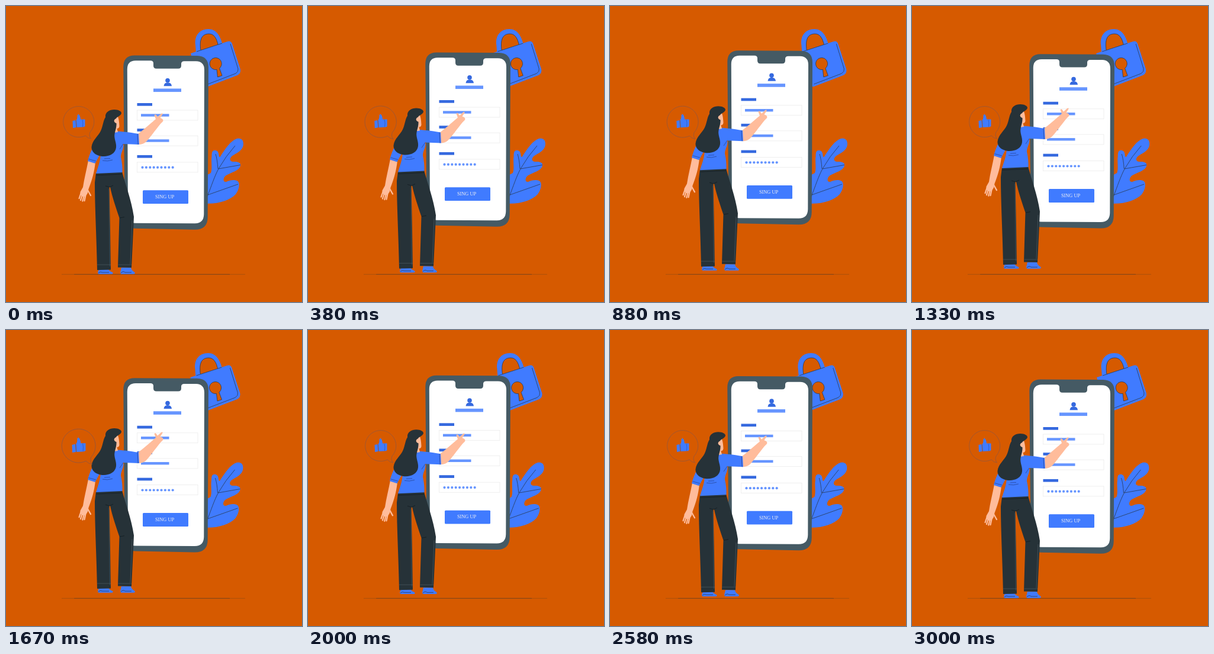
An HTML page with a canvas for the animation above (3.04 s loop, 500 by 500 pixels).

```html
<!DOCTYPE html>
<html lang="en">
<head>
<meta charset="utf-8">
<title>Sign up</title>
<style>
  html, body { margin: 0; width: 100%; height: 100%; overflow: hidden; background: #d65a00; }
  canvas { display: block; width: 500px; height: 500px; }
</style>
</head>
<body>
<canvas id="stage"></canvas>
<script>
const canvas = document.getElementById('stage');
const ctx = canvas.getContext('2d');
const ratio = window.devicePixelRatio || 1;
canvas.width = canvas.height = 500 * ratio;

const BG = '#d65a00', BLUE = '#407bff', DEEP = '#3569df', SOFT = '#6695ff';
const DARK = '#263238', SLATE = '#455a64', SKIN = '#ffbc9b';
const LOOP = 3040, FPS = 24, LAST = 72, CYCLE = 1500, PHONE_Y = 0.7;

function fill(d, color, rule = 'nonzero') {
  ctx.fillStyle = color;
  ctx.fill(new Path2D(d), rule);
}

function line(d, color = DARK, width = 0.7) {
  ctx.strokeStyle = color;
  ctx.lineWidth = width;
  ctx.stroke(new Path2D(d));
}

function bar(x, y, w, h, color) {
  ctx.fillStyle = color;
  ctx.fillRect(x, y, w, h);
}

function dot(x, y, r, color) {
  ctx.fillStyle = color;
  ctx.beginPath();
  ctx.arc(x, y, r, 0, Math.PI * 2);
  ctx.fill();
}

function moved(dx, dy, draw) {
  ctx.save();
  ctx.translate(dx, dy);
  draw();
  ctx.restore();
}

const linear = u => u;
const easeOut = u => 1 - Math.pow(1 - u, 1.4);

// Eased interpolation through [position, value] stops.
function track(stops, p, ease) {
  for (let i = 1; i < stops.length; i++) {
    const [a, va] = stops[i - 1], [b, vb] = stops[i];
    if (p <= b) return va + (vb - va) * ease((p - a) / (b - a));
  }
  return stops[stops.length - 1][1];
}

const SHAKE = [0, -1, 2, -4, 4, -4, 4, -4, 2, -1, 0].map((v, i) => [i / 10, v]);
const BEAT = [[0, 1], [0.1, 1.1], [0.3, 1], [0.4, 1], [0.5, 1.1], [0.6, 1], [1, 1]];

const phase = (t, period) => (t % period) / period;
const float = (t, period) => -10 * (1 - Math.abs(1 - 2 * phase(t, period)));
const shake = t => t < 0 ? 0 : track(SHAKE, phase(t, CYCLE), easeOut);

function ground() {
  line('M94 453.3H404', 'rgba(38,50,56,.35)', 0.7);
  line('M115 453.3H378', 'rgba(38,50,56,.45)', 0.8);
}

function lock() {
  fill('M321 80 L320 66 C318 51 326 39 342 39 C355 39 362 50 366 66 Z ' +
       'M329 75 C327 61 328 47 343 47 C352 47 356 56 358 65 Z', BLUE, 'evenodd');
  line('M329 75 C327 61 328 47 343 47 C352 47 356 56 358 65');
  fill('M312 80 L374 60 Q380 58 382 64 L396 107 Q397 114 391 117 L340 136.500 L326 130 Z', BLUE);
  line('M322 77 L365 63 M379 64 L392 106 Q393 111 388 114 L341 132');
  const hole = 'M356 107.300 A10 10 0 1 1 360.500 105.200 L365 117.500 L357.500 120 Z';
  fill(hole, BG);
  line(hole);
}

function leaf() {
  fill('M335 333.500 C357 335 378 329 388 318 C393 311 395 303 393 298 C390 292 379 294 372 297 ' +
       'C366 298 366 290 372 286 C381 281 394 278 396 270 C397.500 263 389 263 383 263 ' +
       'C377 262 377 256 384 252 C393 247 401 242 401 233 C401 225 396 223 390 224 ' +
       'C379 228 371 240 361.500 255 C358 255 361.500 246 354.500 244 C348.500 243 347.500 247 347.500 254 ' +
       'C346 262 349 275 346 282 L335 288 Z', BLUE);
  line('M340 322 C347 304 352 288 359 275 Q371 254 387 236 M358 275 Q357 259 354 250 ' +
       'M359 275 L396 268.500 M341 319 L392 301');
}

function phone() {
  fill('M217 82.800 L323 83.300 Q342 84 342 103 L340.700 356 Q340.500 377 319 377 L218 375 ' +
       'Q201 375 200.500 357 L198.300 102 Q198.300 82.800 217 82.800 Z', SLATE);
  fill('M219 91.500 L244 91.500 Q249 91.500 249 96 V100 Q249 105 254 105 H291 Q296 105 296 100 V97 ' +
       'Q296 92.500 301 92.500 L321 92.500 Q335 93 335 107 L334.300 351 Q334 366.500 319 366.500 ' +
       'L218 366 Q206 366 206 352 L204.800 106 Q204.800 91.500 219 91.500 Z', '#fff');

  dot(273, 125, 3.8, DEEP);
  fill('M266.500 134.500 Q267 128.500 273 128.500 Q279.500 128.500 280 134.500 Z', DEEP);
  bar(249, 138.8, 47, 5.6, SOFT);

  for (const y of [163.3, 206.5, 251.2]) {
    bar(221.5, y, 25.5, 4.7, DEEP);
    ctx.strokeStyle = '#ebebeb';
    ctx.lineWidth = 0.8;
    ctx.strokeRect(221.5, y + 12, 102.5, 17);
  }
  bar(228, 181.6, 47.5, 4.4, SOFT);
  bar(228, 224.6, 47.5, 4.4, SOFT);
  for (let i = 0; i < 9; i++) dot(230.5 + i * 6.4, 272, 2.1, SOFT);

  ctx.fillStyle = BLUE;
  ctx.beginPath();
  ctx.roundRect(231, 310.6, 77, 22.8, 1.5);
  ctx.fill();
  ctx.fillStyle = '#f2f2f2';
  ctx.font = '8.3px "Liberation Serif", "Times New Roman", serif';
  ctx.textAlign = 'center';
  ctx.fillText('SING UP', 268, 324.4);
}

function arms() {
  fill('M223 216 C234 208 243 199 253 191 L250.500 184.500 Q252 182 254 184.500 L256 187.500 ' +
       'L262 182 Q265 180 264.500 183 L260.500 189 Q267 191 265 195 L261 199 ' +
       'C252 210 242 224 236 230 Q231 234 224 234 Z', SKIN);
  fill('M139 261 L151 264 C149 281 146 292 139.500 309 L138 316 Q135 322 130 322 ' +
       'Q125 321 125.500 314 L130 306 C132 292 136 277 139 261 Z', SKIN);
  ctx.lineCap = 'round';
  line('M127 315 L123.600 325 M129 318 L126 328 M132 319 L129.300 329.500 M135 317 L132.500 329 ' +
       'M138 311 L143 320', SKIN, 2.3);
  ctx.lineCap = 'butt';
}

function shoes() {
  fill('M157 445 H173 Q175 448 180 450 Q182 452.500 178 452.700 H156 L155 450 Z', BLUE);
  fill('M195 442 H211 Q212 447 217 449.500 Q219.500 452.500 215 452.700 H194 L193 450 Z', BLUE);
  line('M156 451 Q159 448 163 450 H174 M194 451 Q198 447 201 450 H212');
}

function trousers() {
  fill('M152 282 L196 280 C201 299 212 328 216 356 L214 400 L212 442 L189 441.500 L191.500 358 ' +
       'C186 341 180 325 176 306 L174.500 306 L176 380 L177 445.500 L154 446 C153 391 150 340 150 298 Z', DARK);
  const seam = '#5a6a72';
  line('M152 286 L196 284 M168 304 L175 306 L181 303 M192 358 L200 356.500', '#11191d', 0.7);
  line('M174 309 L175.500 440 M154 437 H177 M189.500 437 H212 M213 362 L210 436', seam, 0.5);
}

function shirt() {
  fill('M183 211 C194 212 207 213 224 216 L225 234 L198 233 C200 240 194 247 194 255 ' +
       'C196 264 197 273 196.500 281 L152 283 C156 270 160 260 160 248 L150.500 266 L138 262 ' +
       'C141 250 146 240 151 232 Z', BLUE);
  line('M222 216 L223 234 M198 233 L192 242 M139.500 258.500 L152 262 M163 261 Q171 263 180 260 ' +
       'M166 258 L176 257.500', '#23408c', 0.7);
}

function head() {
  fill('M181 188 L189 187 Q191 192 191.500 203 Q191 207 187.500 207 L189 213 L182 214 Z', SKIN);
  fill('M168 188 C167 179 175 175 183 175 C190 175 195 178 195 181 C194 186 187 187 186 190 ' +
       'C181 192 182 197 186.500 198 C187 204 185 209 183.500 216 C182 224 187 231 186 239 ' +
       'C185 249 175 254 165 254 C153 254 144 247 144.500 238 C146 226 156 220 160 211 C164 202 164 194 168 188 Z', DARK);
}

function woman() {
  arms();
  shoes();
  trousers();
  shirt();
  head();
}

function bubble(scale) {
  ctx.save();
  ctx.translate(123, 195);
  ctx.scale(scale, scale);
  ctx.translate(-123, -195);
  line('M134 219 A26 26 0 1 1 142 213 Q139.500 219 143.500 224 Q138 223.500 134 219', '#8a5648', 0.7);
  fill('M112.500 194 L117.500 193 L118.500 205 L113 206 Z ' +
       'M118.500 193 Q121 190 120.500 185 Q121.500 182 123.500 183.500 Q125.500 186 126 191.500 ' +
       'L133.500 191.500 L133.500 203 Q132 204.500 129 204.500 L119.500 205 Z', BLUE);
  line('M118.300 193 L119 205 M129 192 Q130.500 197 129.500 204', '#2a4790', 0.5);
  ctx.restore();
}

function render(t) {
  ctx.setTransform(ratio, 0, 0, ratio, 0, 0);
  bar(0, 0, 500, 500, BG);
  ground();
  moved(shake(t), 0, lock);
  moved(shake(t - 1000), 0, leaf);
  moved(0, PHONE_Y + float(t, CYCLE), phone);
  moved(0, float(t, CYCLE * 2), woman);
  bubble(track(BEAT, phase(t, CYCLE), linear));
}

// Steps at 24 per second, each start rounded to 10 ms.
function stepTime(ms) {
  let i = Math.min(LAST, Math.ceil(ms * FPS / 1000));
  while (i > 0 && Math.round(i * 100 / FPS) * 10 > ms) i--;
  return i * 1000 / FPS;
}

const start = performance.now();
function tick() {
  render(stepTime((performance.now() - start) % LOOP));
  requestAnimationFrame(tick);
}
tick();
</script>
</body>
</html>
```
